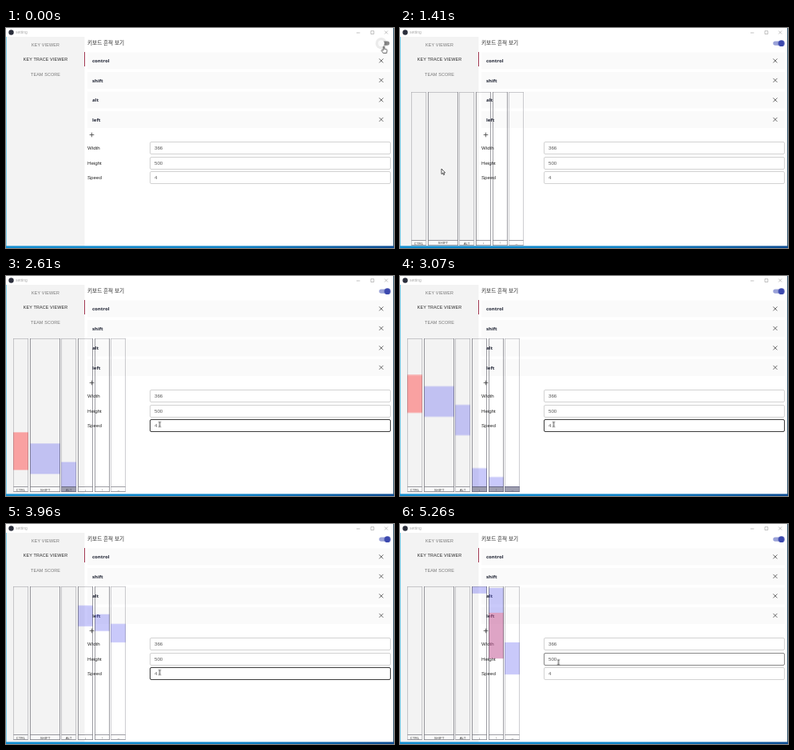
An HTML page that plays this animation: 486 by 275 pixels, repeating every 5310 ms.

```html
<!DOCTYPE html>
<html lang="ko">
<head>
<meta charset="utf-8">
<title>Key trace settings</title>
<style>
  html, body { margin: 0; width: 100%; height: 100%; overflow: hidden; background: #fff; }
  svg { display: block; width: 486px; height: 275px; }
  text { font: 6.16px "Liberation Sans", Arial, sans-serif; fill: #222; }
  .title { font-size: 5px; fill: #aaa; }
  .tab { font-size: 5.39px; letter-spacing: .154px; text-anchor: middle; fill: #757575; }
  .tab.on { fill: #222; }
  .heading { font: 6.6px "Noto Sans CJK KR", "Noto Sans CJK", sans-serif; }
  .name { font: 600 6px "Noto Sans", "Open Sans", sans-serif; fill: #1c2030; }
  .value { fill: #555; }
  .card { fill: #fafafa; }
  .icon { fill: none; stroke: #444; stroke-width: .8; }
  .chrome { fill: none; stroke: #999; stroke-width: .6; }
  .field { fill: #fff; stroke: #d2d2d2; }
  .focus { fill: none; stroke: #3c3c3c; }
  .lane { fill: none; stroke: #3c3c48; stroke-opacity: .5; }
  .thin { stroke-opacity: .25; }
  .key { fill: #fff; fill-opacity: .5; }
  .cap { font-size: 4.4px; text-anchor: middle; fill: #444; }
  .press { fill: #5a5a78; fill-opacity: .58; }
  .blue { fill: rgba(100, 100, 240, .35); }
  .red { fill: rgba(255, 80, 80, .5); }
  .pink { fill: rgba(195, 90, 150, .55); }
  .pointer { fill: #fff; stroke: #111; stroke-width: .7; stroke-linejoin: round; }
</style>
</head>
<body>
<svg viewBox="0 0 486 275">
  <defs>
    <linearGradient id="edge">
      <stop stop-color="#128fd2"/><stop offset=".6" stop-color="#1084c8"/><stop offset="1" stop-color="#0c4c92"/>
    </linearGradient>
    <clipPath id="track"><rect x="0" y="78" width="160" height="186"/></clipPath>
  </defs>

  <rect width="486" height="275" fill="#fff"/>
  <rect y="11" width="98.5" height="262" fill="#f3f3f3"/>
  <circle cx="6.5" cy="5.5" r="3.2" fill="#2b2e3b"/>
  <text class="title" x="12" y="7.3">setting</text>
  <path class="chrome" d="M439 6h4.4M457 3.7h3.8v3.8h-3.8zM474.2 3.5l4 4m0-4l-4 4"/>

  <text class="tab" x="49.5" y="22.6">KEY VIEWER</text>
  <text class="tab on" x="49.5" y="41.1">KEY TRACE VIEWER</text>
  <text class="tab" x="49.5" y="59.6">TEAM SCORE</text>
  <rect x="98" y="30" width="1" height="18" fill="#a33a52"/>

  <text class="heading" x="102" y="21.3">키보드 흔적 보기</text>
  <g id="rows"></g>
  <path class="icon" d="M104.7 133.5h5.6m-2.8-2.8v5.6"/>
  <g id="fields"></g>

  <rect id="rail" x="467.3" y="16.4" width="13.1" height="5.4" rx="2.7"/>
  <g id="knob">
    <circle id="ripple" cx="470" cy="19.2" r="7.2" fill="#000" fill-opacity=".08"/>
    <circle id="thumb" cx="470" cy="19.2" r="3.9"/>
  </g>

  <g id="overlay">
    <g clip-path="url(#track)"><g id="strip"></g></g>
    <g id="solid"></g>
    <g id="faint"></g>
    <path id="topBar" d="M10 77.5h140" stroke="#444"/>
  </g>

  <rect y="11" width="1" height="262" fill="#7fd0ea"/>
  <rect x="485" width="1" height="273" fill="#33566f"/>
  <rect y="272.4" width="486" height="2.6" fill="url(#edge)"/>

  <g id="cursor">
    <path id="hand" class="pointer" d="M-.7 .6Q0-.5 .7 .6V3.3L3.4 4Q4.3 4.4 4.1 5.4L3.4 8.5H-.8L-3 5.4Q-3 4-.7 5z"/>
    <path id="arrow" class="pointer" d="M0 0V6.6L1.5 5.3L2.6 7.7L3.7 7.2L2.6 4.9H4.6z"/>
    <path id="beam" d="M-1.5-3.1Q0-3.1 0-2.4Q0-3.1 1.5-3.1M0-2.4V2.4M-1.5 3.1Q0 3.1 0 2.4Q0 3.1 1.5 3.1" fill="none" stroke="#111" stroke-width=".8"/>
  </g>
</svg>

<script>
const LOOP = 5310;
const SPEED = 0.1555; // px per ms
const KEY_TOP = 264;
const $ = id => document.getElementById(id);
const rules = [];

function add(parent, tag, attrs, text) {
  const el = document.createElementNS("http://www.w3.org/2000/svg", tag);
  for (const k in attrs) el.setAttribute(k, attrs[k]);
  if (text) el.textContent = text;
  return parent.appendChild(el);
}

// stops: [ms, css] pairs; the last one holds until the loop ends
function animate(id, stops, timing = "linear") {
  const all = [...stops, [LOOP, stops[stops.length - 1][1]]];
  const body = all.map(([ms, css]) => `${ms / LOOP * 100}%{${css}}`).join("");
  rules.push(`@keyframes ${id}{${body}} #${id}{animation:${id} ${LOOP}ms ${timing} infinite}`);
}
const move = (x, y) => `transform:translate(${x}px,${y}px)`;
const path = (id, points) => animate(id, points.map(([ms, x, y]) => [ms, move(x, y)]));

// visible during each [from, to] span
function show(id, ...spans) {
  const stops = spans[0][0] > 0 ? [[0, "opacity:0"]] : [];
  for (const [from, to] of spans) {
    stops.push([from, "opacity:1"]);
    if (to < LOOP) stops.push([to, "opacity:0"]);
  }
  animate(id, stops, "step-end");
}

["control", "shift", "alt", "left"].forEach((name, i) => {
  const y = 41 + i * 24.5;
  add($("rows"), "rect", { class: "card", x: 102, y: y - 10.6, width: 380, height: 21 });
  add($("rows"), "text", { class: "name", x: 108, y: y + 2.2 }, name);
  add($("rows"), "path", { class: "icon", d: `M467.5 ${y - 2.6}l5 5m0-5l-5 5` });
});

[["Width", "366"], ["Height", "500"], ["Speed", "4"]].forEach(([label, value], i) => {
  const y = 150.2 + i * 18.45;
  const box = { x: 180.5, y: Math.floor(y - 7.2) - .5 + (i > 0), width: 301, height: 15, rx: 1.5 };
  box.y = Math.floor(142.7 + i * 18.5) + .5;
  add($("fields"), "text", { x: 102, y: y + 2.1 }, label);
  add($("fields"), "rect", { class: "field", ...box });
  add($("fields"), "rect", { class: "focus", id: "focus" + label, ...box });
  add($("fields"), "text", { class: "value", x: 186, y: y + 2.2 }, value);
});

// left, right, caption, layer, presses as [colour, from, to]
const lanes = [
  [9.5, 27.5, "CTRL", "faint", [["red", 2167, 2470]]],
  [30.5, 67.5, "SHIFT", "solid", [["blue", 2257, 2502]]],
  [69.5, 87.5, "ALT", "faint", [["blue", 2406, 2651]]],
  [90.5, 108.5, "↓", "solid", [["blue", 2915, 3083], ["blue", 4010, 4119]]],
  [111.5, 129.5, "↑", "solid", [["blue", 2986, 3121], ["blue", 4074, 4274], ["pink", 4274, 4642]]],
  [131.5, 149.5, "→", "faint", [["blue", 3063, 3212], ["blue", 4512, 4770]]]
];
lanes.forEach(([x, right, cap, layer, presses], i) => {
  const g = $(layer), fill = { x: x - .5, width: right - x + 1 };
  for (const [colour, from, to] of presses)
    add($("strip"), "rect", { class: colour, ...fill, y: KEY_TOP + .4 + from * SPEED, height: (to - from) * SPEED });
  add(g, "rect", { class: "key", ...fill, y: KEY_TOP, height: 6 });
  add(g, "path", { class: layer === "faint" ? "lane thin" : "lane", d: `M${x} 78V270M${right} 78V270` });
  add(g, "path", { class: "lane thin", d: `M${x} 78.5H${right}` });
  add(g, "path", { class: "lane", d: `M${x} 263.5H${right}M${x} 269.5H${right}` });
  add(g, "text", { class: "cap", x: (x + right) / 2, y: 268.5 }, cap);
  add(g, "rect", { id: "press" + i, class: "press", ...fill, y: 263, height: 7 });
  show("press" + i, ...presses.map(p => p.slice(1)));
});
path("strip", [[0, 0, 0], [LOOP, 0, -SPEED * LOOP]]);

// trace window: opens, then is dragged to the lower left
path("overlay", [[0, 200, 47], [1080, 200, 47], [1130, 196, 46], [1360, 9, 4], [1410, 5, 2], [1510, 0, 0]]);
rules.push(`@keyframes open{0%{visibility:hidden}${400 / LOOP * 100}%,100%{visibility:visible}}
  #overlay{animation:overlay ${LOOP}ms linear infinite,open ${LOOP}ms step-end infinite}`);
show("faint", [1360, LOOP]);
show("topBar", [0, 1360]);

path("knob", [[0, 0, 0], [30, 0, 0], [180, 7.7, 0]]);
animate("rail", [[0, "fill:#8b8b8b"], [30, "fill:#8b8b8b"], [180, "fill:#9aa2d8"]]);
animate("thumb", [[0, "fill:#fafafa"], [30, "fill:#fafafa"], [180, "fill:#3c49ae"]]);
animate("ripple", [[0, "opacity:1"], [850, "opacity:1"], [950, "opacity:0"]]);

path("cursor", [
  [0, 473.3, 22.8], [850, 473.3, 22.8], [1060, 247, 221], [1080, 247, 221], [1130, 243, 220],
  [1360, 56, 178], [1410, 52, 176], [1510, 47, 174], [1690, 47, 174], [1850, 192.5, 185.5],
  [4930, 192.5, 185.5], [5150, 198.5, 172.7]
]);
show("hand", [0, 880]);
show("arrow", [880, 1840]);
show("beam", [1840, LOOP]);
rules.push("#focusWidth{opacity:0}");
show("focusSpeed", [1880, 5200]);
animate("focusHeight", [[0, "opacity:0"], [5200, "opacity:.5"]], "step-end");

document.head.appendChild(document.createElement("style")).textContent = rules.join("\n");
</script>
</body>
</html>
```
